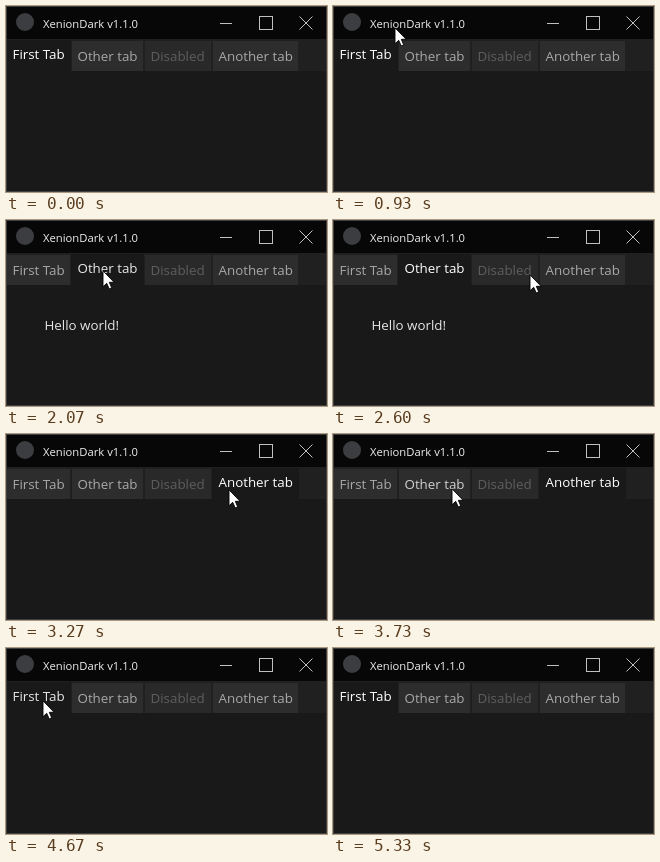
An HTML page that plays this animation: 321 px wide and 186 px high, repeating every 5670 ms.

```html
<!DOCTYPE html>
<html lang="en">
<head>
<meta charset="utf-8">
<title>Tab control</title>
<style>
  html, body { margin: 0; width: 100%; height: 100%; overflow: hidden; background: #191919; }
  svg { display: block; width: 100%; height: 100%; }
  text { font: 13.35px "Open Sans", "Noto Sans", sans-serif; white-space: pre; }
  .title { font-size: 11.25px; fill: #f0f0f0; }
  .hello { fill: #e6e6e6; }
  .controls { fill: none; stroke: #c0c0c0; }
</style>
</head>
<body>
<svg viewBox="0 0 321 186">
  <rect width="321" height="186" fill="#191919"/>
  <rect width="321" height="33" fill="#070707"/>
  <rect y="33" width="321" height="32" fill="#202020"/>
  <circle cx="19" cy="16" r="9" fill="#3b3d40"/>
  <text class="title" x="37" y="22">XenionDark v1.1.0</text>
  <g class="controls">
    <path d="M214 17.5H226M253.5 10.5h13v13h-13z" shape-rendering="crispEdges"/>
    <path d="M293.5 10.5l13 13M306.5 10.5l-13 13"/>
  </g>
  <g id="tabs"></g>
  <text class="hello" id="hello" x="38.5" y="110">Hello world!</text>
  <rect x=".5" y=".5" width="320" height="185" fill="none" stroke="#404040"/>
  <path id="cursor" d="M0 .8V16.8L3.7 13.3L6.2 18.9L8.7 17.8L6.3 12.3H11.1Z"
        fill="#fff" stroke="#000" stroke-width=".9"/>
</svg>
<script>
const LOOP = 5670, TICK = 1000 / 15;
const FIRST = 0, OTHER = 1, DISABLED = 2, ANOTHER = 3;
const TOP = 35, BOTTOM = 65, GAP = 2;

const tabs = [
  { label: "First Tab", w: 63 },
  { label: "Other tab", w: 71 },
  { label: "Disabled", w: 66 },
  { label: "Another tab", w: 85 }
];

// Pointer moves, in ticks; a move that names a tab ends with a click on it.
const enter = { x: 74, y: 8 };
const moves = [
  { start: 12, end: 20, x: 30, y: 57 },
  { start: 23, end: 30, x: 97, y: 50, tab: OTHER },
  { start: 35, end: 41, x: 240, y: 55, tab: ANOTHER },
  { start: 48, end: 56, x: 119, y: 54, tab: OTHER },
  { start: 62, end: 69, x: 37, y: 52, tab: FIRST },
  { start: 75, end: 80, x: 35, y: 186 }
];

const $ = id => document.getElementById(id);
const clamp = k => Math.min(1, Math.max(0, k));
const ease = k => 1 - (1 - k) ** 1.1;

function add(parent, name, attrs) {
  const el = document.createElementNS("http://www.w3.org/2000/svg", name);
  set(el, attrs);
  return parent.appendChild(el);
}

function set(el, attrs) {
  for (const key in attrs) el.setAttribute(key, attrs[key]);
}

let left = 1;
for (const tab of tabs) {
  tab.x = left;
  tab.back = add($("tabs"), "rect", {});
  tab.text = add($("tabs"), "text", { x: left + 5.5 });
  tab.text.textContent = tab.label;
  left += tab.w + GAP;
}

function pointerAt(tick) {
  if (tick < moves[0].start || tick >= moves.at(-1).end) return null;
  let { x, y } = enter;
  for (const m of moves) {
    const k = ease(clamp((tick - m.start) / (m.end - m.start)));
    x += (m.x - x) * k;
    y += (m.y - y) * k;
  }
  return { x: Math.round(x), y: Math.round(y) };
}

function selectionAt(tick) {
  const last = moves.filter(m => "tab" in m && m.end < tick).pop();
  return last ? { tab: last.tab, age: tick - last.end - 1 } : { tab: FIRST, age: Infinity };
}

// A freshly clicked tab keeps its hover tint, then brightens in two ticks.
function selectedColor(age) {
  const level = Math.round(232 + 23 * clamp((age - 3) / 2));
  return `rgb(${level},${level},${level})`;
}

function drawTab(tab, i, selection, tip) {
  const on = i === selection.tab, off = i === DISABLED;
  const grow = on ? 1 : 0;
  const hover = tip && tip.y >= TOP && tip.y < BOTTOM && tip.x >= tab.x && tip.x < tab.x + tab.w;
  set(tab.back, {
    x: tab.x - grow, y: TOP - grow, width: tab.w + 2 * grow, height: BOTTOM - TOP + grow,
    fill: on ? "#191919" : off ? "#292929" : "#2d2d2d"
  });
  set(tab.text, {
    y: on ? 53 : 55,
    fill: on ? selectedColor(selection.age) : off ? "#5e5e5e" : hover ? "#d0d0d0" : "#a8a8a8"
  });
}

function draw(time) {
  const tick = Math.floor(time / TICK + .06);
  const selection = selectionAt(tick), tip = pointerAt(tick);
  tabs.forEach((tab, i) => drawTab(tab, i, selection, tip));
  $("hello").style.display = selection.tab === OTHER ? "" : "none";
  $("cursor").style.display = tip ? "" : "none";
  if (tip) set($("cursor"), { transform: `translate(${tip.x} ${tip.y})` });
}

const start = performance.now();
function loop() {
  draw((performance.now() - start) % LOOP);
  requestAnimationFrame(loop);
}
loop();
</script>
</body>
</html>
```
